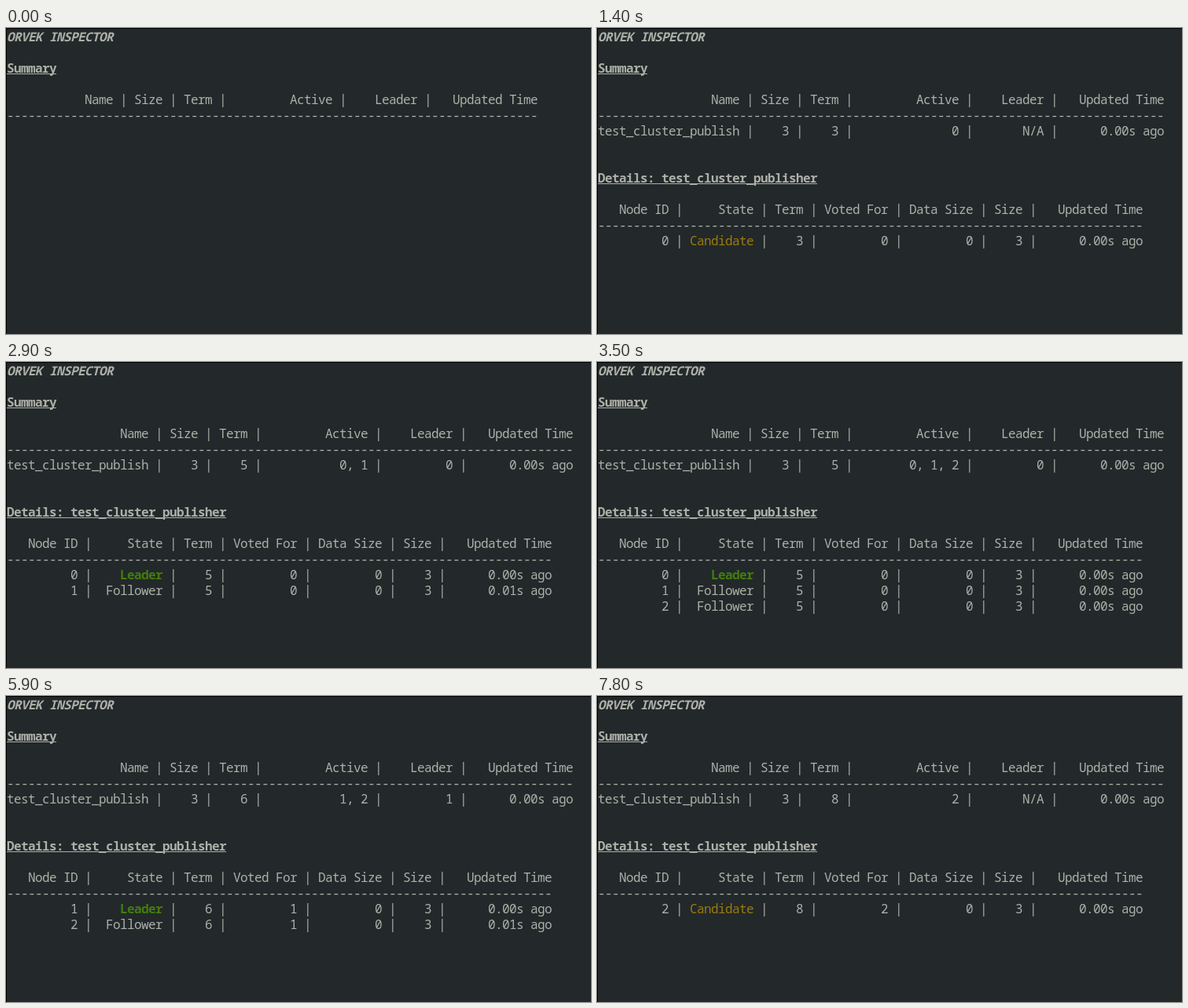
These frames come from a looping animation (744 px wide and 390 px high, 8 s). An HTML page:

```html
<!DOCTYPE html>
<html lang="en">
<head>
<meta charset="utf-8">
<title>Cluster inspector</title>
<style>
  html, body {
    margin: 0;
    width: 100%;
    height: 100%;
    overflow: hidden;
    background: #23282a;
  }
  body {
    box-sizing: border-box;
    border: solid #000;
    border-width: 1px 0 0 1px;
  }
  pre {
    position: absolute;
    left: 1px;
    top: 1px;
    margin: 0;
    color: #adb0a8;
    font: 16px/20px "Noto Sans Mono", "DejaVu Sans Mono", monospace;
    font-variant-ligatures: none;
    letter-spacing: calc(9px - 1ch); /* 9px terminal cells */
  }
  b { font-weight: 700; }
  .title { font-style: italic; }
  .head {
    text-decoration: underline 1px;
    text-underline-offset: 1px;
    text-decoration-skip-ink: none;
  }
  .leader { color: #427d0d; }
  .candidate { color: #987c0c; }
</style>
</head>
<body>
<pre id="screen"></pre>
<script>
const LOOP = 8000;
const CLUSTER = 'test_cluster_publisher';
const SUMMARY = [20, 4, 4, 14, 9, 14];
const DETAILS = [10, 9, 4, 9, 9, 4, 14];
const STATES = { F: 'Follower', C: 'Candidate', L: 'Leader' };

// Each node is written as id, state, term, vote, age in hundredths.
const steps = [
  [0, ''],
  [700, '0F000'],
  [900, '0C100'],
  [1200, '0C200'],
  [1400, '0C300'],
  [1700, '0C400 1F000'],
  [1900, '0L500 1F501'],
  [2000, '0L500 1F500'],
  [2900, '0L500 1F501'],
  [3100, '0L500 1F500 2F000'],
  [3200, '0L500 1F500 2F500'],
  [3300, '0L500 1F501 2F500'],
  [3400, '0L500 1F500 2F501'],
  [3500, '0L500 1F500 2F500'],
  [3600, '0L500 1F501 2F500'],
  [3700, '0L500 1F500 2F501'],
  [3900, '0L500 1F500 2F500'],
  [4100, '0L500 1F500 2F501'],
  [4200, '0L500 1F500 2F500'],
  [4900, '1F500 2F500'],
  [5200, '1L610 2F610'],
  [5900, '1L610 2F611'],
  [6000, '1L610 2F610'],
  [6100, '1L610 2F611'],
  [6200, '1L610 2F610'],
  [6800, '1L610 2F611'],
  [6900, '1L610 2F610'],
  [7100, '1L610 2F611'],
  [7200, '2F610'],
  [7600, '2C720'],
  [7800, '2C820']
];

const row = (widths, cells) =>
  cells.map((cell, i) => String(cell).padStart(widths[i])).join(' | ');
const rule = widths =>
  '-'.repeat(widths.reduce((sum, w) => sum + w + 3, -3));
const ago = age => `0.0${age}s ago`;
const bold = (cls, text) => `<b class="${cls}">${text}</b>`;

function nodeRow([id, state, term, vote, age]) {
  return row(DETAILS, [id, STATES[state], term, vote, 0, 3, ago(age)])
    .replace('Leader', bold('leader', 'Leader'))
    .replace('Candidate', '<span class="candidate">Candidate</span>');
}

function render(text) {
  const nodes = text ? text.split(' ') : [];
  const widths = nodes.length ? SUMMARY : [15, ...SUMMARY.slice(1)];
  const lines = [
    bold('title', 'ORVEK INSPECTOR'), '',
    bold('head', 'Summary'), '',
    row(widths, ['Name', 'Size', 'Term', 'Active', 'Leader', 'Updated Time']),
    rule(widths)
  ];
  if (nodes.length) {
    const leader = nodes.find(n => n[1] === 'L');
    lines.push(
      row(widths, [
        CLUSTER.slice(0, 20), 3,
        Math.max(...nodes.map(n => n[2])),
        nodes.map(n => n[0]).join(', '),
        leader ? leader[0] : 'N/A',
        ago(0)
      ]), '', '',
      bold('head', 'Details: ' + CLUSTER), '',
      row(DETAILS, ['Node ID', 'State', 'Term', 'Voted For', 'Data Size', 'Size', 'Updated Time']),
      rule(DETAILS),
      ...nodes.map(nodeRow)
    );
  }
  return lines.join('\n');
}

const screen = document.getElementById('screen');
const start = performance.now();
let shown = null;

function draw(now) {
  const t = Math.max(0, now - start) % LOOP;
  const step = steps.findLast(s => s[0] <= t);
  if (step !== shown) {
    shown = step;
    screen.innerHTML = render(step[1]);
  }
  requestAnimationFrame(draw);
}
draw(start);
</script>
</body>
</html>
```
